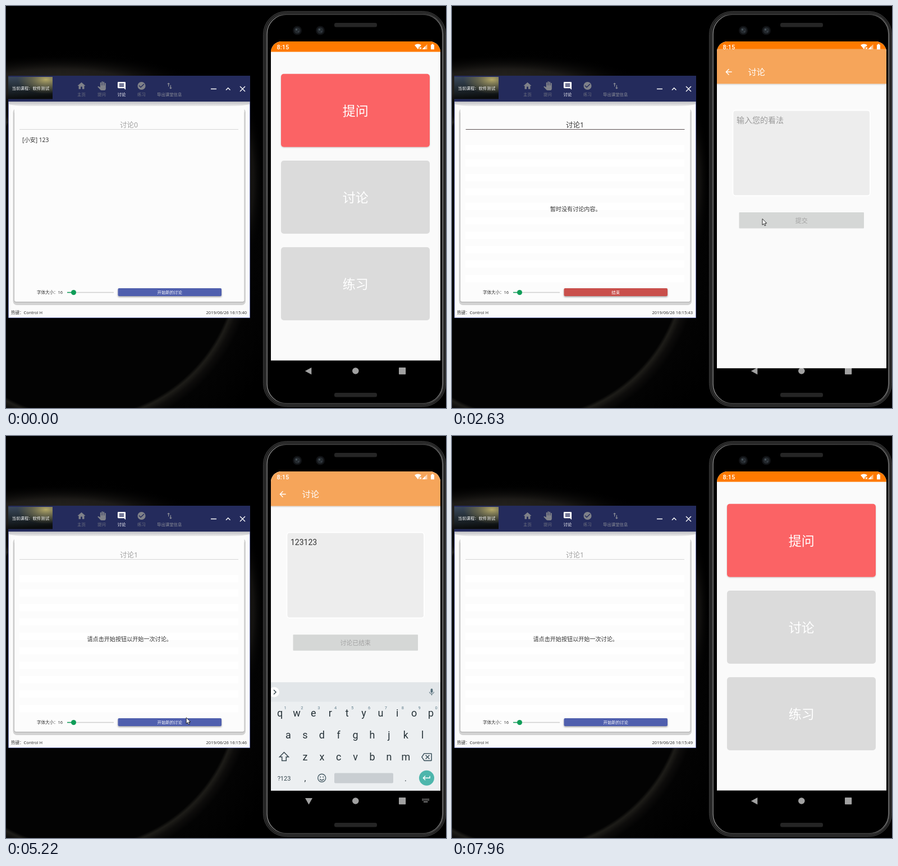
Animation, 784 px wide and 715 px high, one loop 8010 ms. Source, as an HTML page:

```html
<!DOCTYPE html>
<html lang="zh-CN">
<head>
<meta charset="utf-8">
<title>课堂讨论</title>
<style>
html,body{margin:0;width:100%;height:100%;overflow:hidden;background:#000}
svg{display:block;width:784px;height:715px}
text{font-family:"Noto Sans","Noto Sans CJK SC","Noto Sans CJK",sans-serif;white-space:pre}
.phone text{font-family:Roboto,"Noto Sans CJK SC","Noto Sans CJK",sans-serif}
</style>
</head>
<body>
<svg id="stage" viewBox="0 0 784 715"></svg>
<script>
const LOOP = 8010;
const stage = document.getElementById('stage');

// Drawing helpers; text is placed by its vertical centre, with its baseline on a whole pixel.
const text = (x, cy, size, str, fill = '#fff', anchor = 'middle', extra = '') =>
  `<text x="${x}" y="${Math.round(cy + size * .37)}" font-size="${size}" fill="${fill}" text-anchor="${anchor}" ${extra}>${str}</text>`;
const rect = (x, y, w, h, fill, r = 0, extra = '') =>
  `<rect x="${x}" y="${y}" width="${w}" height="${h}" rx="${r}" fill="${fill}" ${extra}/>`;
const circle = (x, y, r, fill, extra = '') => `<circle cx="${x}" cy="${y}" r="${r}" fill="${fill}" ${extra}/>`;
const line = (d, stroke, width, extra = '') =>
  `<path d="${d}" fill="none" stroke="${stroke}" stroke-width="${width}" ${extra}/>`;
const icon = (d, cx, cy, size, fill) =>
  `<path d="${d}" fill="${fill}" transform="translate(${cx - size / 2} ${cy - size / 2}) scale(${size / 24})"/>`;
const range = n => [...Array(n).keys()];

const ICONS = {
  home: 'M10 20v-6h4v6h5v-8h3L12 3 2 12h3v8z',
  hand: 'M23 5.5V20c0 2.2-1.8 4-4 4h-7.3c-1.1 0-2.1-.4-2.9-1.2L1 14.8l1.3-1.2c.4-.4 1-.4 1.4-.1L8 15.9V4c0-.8.7-1.5 1.5-1.5S11 3.2 11 4v7h1V1.5a1.5 1.5 0 0 1 3 0V11h1V2.5a1.5 1.5 0 0 1 3 0V11h1V5.5a1.5 1.5 0 0 1 3 0z',
  comment: 'M22 4a2 2 0 0 0-2-2H4a2 2 0 0 0-2 2v12a2 2 0 0 0 2 2h14l4 4zM18 14H6v-2h12zm0-3H6V9h12zm0-3H6V6h12z',
  check: 'M12 2a10 10 0 1 0 0 20 10 10 0 0 0 0-20zm-2 15l-5-5 1.4-1.4 3.6 3.6 7.6-7.6L19 8z',
  swap: 'M9 3L5 7h3v7h2V7h3zm7 14v-7h-2v7h-3l4 4 4-4z',
  back: 'M20 11H7.8l5.6-5.6L12 4l-8 8 8 8 1.4-1.4L7.8 13H20z',
  mic: 'M12 14a3 3 0 0 0 3-3V5a3 3 0 0 0-6 0v6a3 3 0 0 0 3 3zm5.3-3a5.3 5.1 0 0 1-10.6 0H5c0 3.4 2.7 6.2 6 6.7V21h2v-3.3c3.3-.5 6-3.3 6-6.7z',
  enter: 'M19 7v4H5.8l3.6-3.6L8 6l-6 6 6 6 1.4-1.4L5.8 13H21V7z',
  erase: 'M22 3H7c-.7 0-1.2.4-1.6.9L0 12l5.4 8.1c.4.5.9.9 1.6.9h15a2 2 0 0 0 2-2V5a2 2 0 0 0-2-2zm0 16H7.1L2.4 12l4.7-7H22zm-11.6-2L14 13.4l3.6 3.6 1.4-1.4-3.6-3.6L19 8.4 17.6 7 14 10.6 10.4 7 9 8.4l3.6 3.6L9 15.6z'
};

const defs = `<defs>
  <radialGradient id="corona" gradientUnits="userSpaceOnUse" cx="135" cy="455" r="380">
    <stop offset=".725" stop-color="#030303"/><stop offset=".74" stop-color="#1d1c18"/>
    <stop offset=".765" stop-color="#0d0c0b"/><stop offset=".8" stop-color="#030303"/><stop offset="1" stop-color="#000"/>
  </radialGradient>
  <radialGradient id="glow"><stop offset="0" stop-color="#2b2823"/><stop offset=".5" stop-color="#1d1b18"/><stop offset="1" stop-color="#000" stop-opacity="0"/></radialGradient>
  <linearGradient id="photo" x1="0" y1="0" x2=".15" y2="1">
    <stop offset="0" stop-color="#3b495c"/><stop offset=".5" stop-color="#222c34"/><stop offset="1" stop-color="#0b0d0d"/>
  </linearGradient>
  <radialGradient id="sun" cx=".85" cy=".12" r=".65"><stop offset="0" stop-color="#b5a968"/><stop offset=".5" stop-color="#77724f" stop-opacity=".7"/><stop offset="1" stop-color="#716b45" stop-opacity="0"/></radialGradient>
  <linearGradient id="strip" x1="0" y1="0" x2="0" y2="1"><stop offset="0" stop-color="#bdbdc2"/><stop offset="1" stop-color="#ececec"/></linearGradient>
  <linearGradient id="rim"><stop offset="0" stop-color="#858585"/><stop offset=".1" stop-color="#4a4a4a"/><stop offset=".9" stop-color="#484848"/><stop offset="1" stop-color="#777"/></linearGradient>
  <clipPath id="screen">${rect(472, 63, 302, 605, '#000', 19)}</clipPath>
  <clipPath id="content">${rect(472, 63, 302, 567.5, '#000')}</clipPath>
  <filter id="soft" x="-10%" y="-40%" width="120%" height="200%"><feDropShadow dx="0" dy="1.5" stdDeviation="1.5" flood-opacity=".38"/></filter>
  <filter id="faint" x="-5%" y="-10%" width="110%" height="125%"><feDropShadow dx="0" dy="1" stdDeviation="1" flood-opacity=".22"/></filter>
</defs>`;

const backdrop = rect(0, 0, 784, 715, '#000') + circle(135, 455, 380, 'url(#corona)') +
  '<ellipse cx="95" cy="138" rx="250" ry="52" fill="url(#glow)"/>' +
  '<ellipse cx="425" cy="310" rx="34" ry="150" fill="url(#glow)" opacity=".6"/>';

const tab = (name, x, label, active) =>
  icon(ICONS[name], x, 142, name === 'hand' ? 16 : 17, active ? '#fff' : '#7f8189') +
  text(x, 157, 7.4, label, active ? '#fff' : '#707380');

const desktop = rect(4, 124, 431, 431, '#3d4a9e') + rect(4.7, 125, 429.6, 429.3, '#fbfbfb') +
  '<path d="M5 170H434V175Q420 178 400 178H38Q18 178 5 175Z" fill="url(#strip)"/>' +
  rect(12.5, 182, 414.5, 350, '#d2d2d2', 7) + rect(14.5, 188, 410.5, 339, '#ababab', 3) +
  rect(15, 178, 409.5, 348, '#fcfcfc', 3) +
  rect(4, 124, 431, 46, '#242b5c') +
  rect(4, 126, 79, 39.5, 'url(#photo)') + rect(4, 126, 79, 39.5, 'url(#sun)') +
  text(10.5, 146, 7.4, '当前课程：软件测试', '#fff', 'start') +
  tab('home', 134.5, '主页') + tab('hand', 170.5, '提问') + tab('comment', 206, '讨论', true) +
  tab('check', 241.5, '练习') + icon(ICONS.swap, 291.5, 142, 15, '#8b8d96') + text(291.2, 157, 7.4, '导出课堂信息', '#8a8c96') +
  line('M365 147.5H375M392 149.5L395.7 145.7 399.5 149.5M417 143L426 152M426 143L417 152', '#fff', 1.4) +
  `<g id="stripes">${range(10).map(i => rect(24, 247 + i * 25.7, 390, 13, '#fff')).join('')}</g>` +
  text(219, 211, 12.5, '', '#999', 'middle', 'id="topic"') +
  '<path id="rule" d="M24.500 219.500H414.500" stroke-width="1"/>' +
  text(29, 238, 10.2, '[小安] 123', '#333', 'start', 'id="first"') +
  text(220.2, 361, 10.1, '', '#333', 'middle', 'id="notice"') +
  text(55, 509, 7.5, '字体大小：16', '#333', 'start') +
  line('M109 509.500H192', '#cfcfcf', 1.5) + line('M109 509.500H120', '#0f9d58', 1.5) + circle(120.5, 509.5, 4.5, '#0f9d58') +
  rect(199.5, 502, 184.5, 14, '#4f5fae', 2, 'id="action" filter="url(#soft)"') +
  text(291.7, 509, 7.4, '', '#fff', 'middle', 'id="actionText"') +
  text(9, 545, 7.5, '热键：Control H', '#333', 'start') +
  text(429, 545, 7.6, '', '#333', 'end', 'id="clock"');

const lens = x => circle(x, 43.5, 8, '#111316') + circle(x, 43.5, 5.5, '#24292e') +
  circle(x - 1.5, 42, 1.7, '#49525a') + circle(x + 2, 45.5, 1.2, '#3b434a');

const body = rect(458.5, 9.5, 325, 703, '#1d1d1d', 41, 'stroke="#3f3f3f"') +
  rect(462, 12.5, 318, 697, '#090909', 38, 'stroke="#333" stroke-width="2"') +
  rect(465, 15, 313, 692, '#000', 35, 'stroke="url(#rim)" stroke-width="1.6"') +
  rect(585, 30, 76, 7.5, '#252525', 3) + rect(585, 688, 76, 7.5, '#252525', 3) + lens(519) + lens(560);

const card = (y, fill, label, id = '') =>
  rect(490, y, 265, 130, fill, 5, id && `id="${id}"`) + text(622.7, y + 65.5, 23, label, '#fff', 'middle', id && `id="${id}Text"`);

const home = rect(472, 63, 302, 567.5, '#fafafa') + rect(472, 63, 302, 18.5, '#ff7a00') +
  `<g filter="url(#faint)">${card(120.7, '#fb6465', '提问')}</g>` +
  card(275, '#dbdbdb', '讨论', 'talk') + card(429, '#dbdbdb', '练习');

const sheet = rect(472, 63, 302, 567.5, '#fafafa') +
  rect(472, 63, 302, 61.5, '#f6a55a', 0, 'filter="url(#faint)"') +
  circle(492, 103, 14, '#fff', 'id="ripple" opacity="0"') +
  icon(ICONS.back, 493, 103.5, 17, '#fff') + text(527.5, 103.5, 15.2, '讨论', '#fff', 'start') +
  rect(500.5, 171.7, 244.5, 152, '#ededed', 5, 'stroke="#fff" stroke-width="1.8"') +
  text(507, 188.6, 14, '', '#333', 'start', 'id="entry"') +
  rect(554, 178.5, 1.6, 19.5, '#d81b60', 0, 'id="caret"') +
  rect(511.5, 353.3, 222.5, 28.4, '#d5d7d6', 1, 'id="submit"') +
  text(622.7, 367.5, 10.9, '提交', '#a3a3a3', 'middle', 'id="submitText"');

const KEY = '#263238';
const keyRow = (keys, x, y) => [...keys].map((k, i) => text(x + i * 29.9, y, 18, k, KEY)).join('');
const keyboard = rect(472, 438, 302, 193, '#eceff1') + rect(472, 438, 302, 34.5, '#e2e6e9') +
  circle(478, 455.5, 9, '#fff') + line('M477 451.500L481 455.500 477 459.500', '#37474f', 1.5) +
  icon(ICONS.mic, 758.5, 455.5, 15, '#546e7a') +
  keyRow('qwertyuiop', 488, 492) + keyRow('asdfghjkl', 503, 531) + keyRow('zxcvbnm', 533, 570) +
  range(10).map(i => text(497.5 + i * 29.9, 483, 7.5, (i + 1) % 10, '#607d8b')).join('') +
  line('M495.500 562.500L487.500 570.700H491.700V577.500H499.300V570.700H503.500Z', '#37474f', 1.5) +
  icon(ICONS.erase, 749.5, 571, 19, '#455a64') +
  text(495.5, 608.5, 11, '?123', '#37474f') + text(533, 608, 15, ',', KEY) + text(712, 608, 15, '.', KEY) +
  circle(562.7, 608.3, 7, 'none', 'stroke="#455a64" stroke-width="1.4"') +
  circle(560.2, 606.5, 1.1, '#455a64') + circle(565.2, 606.5, 1.1, '#455a64') +
  line('M559 610Q562.700 614.500 566.400 610', '#455a64', 1.4) +
  rect(585, 599.5, 105, 18, '#c9ced2', 2) +
  circle(749.5, 608.3, 13.5, '#4db6ac') + icon(ICONS.enter, 749.5, 608.3, 17, '#fff');

const system = `<g fill="#fff" opacity=".63">
    <path id="navBack"/>${circle(622.8, 649, 5.8, '#fff')}${rect(700, 643, 12.2, 12.2, '#fff', .8)}
    <g id="navKeys">${range(12).map(i => rect(741.5 + i % 6 * 2.2, 645 + (i / 6 | 0) * 2.2, 1.4, 1.4, '#fff')).join('')}${rect(744, 650, 7.5, 1.4, '#fff')}</g>
  </g>` + text(482.5, 72.6, 11, '8:15', '#fff', 'start', 'font-weight="500"') +
  '<path d="M728 69.500Q734 65.500 740 69.500L737.500 72.500H735.500V75L734 77Z" fill="#fff"/>' +
  line('M736.800 73.500L740 76.700M740 73.500L736.800 76.700', '#fff', 1.1) +
  '<path d="M741.500 77L750.500 68V77Z" fill="#fff" opacity=".55"/><path d="M741.500 77L747 71.500V77Z" fill="#fff"/>' +
  '<path d="M757 69H758.500V67.500H761.500V69H763V77.200H757Z" fill="#fff"/>';

stage.innerHTML = defs + backdrop + desktop +
  `<g class="phone">${body}<g clip-path="url(#screen)">${home}<g id="sheet">${sheet}</g>
   <g clip-path="url(#content)"><g id="keyboard">${keyboard}</g></g>${system}</g></g>
   <path id="cursor" d="M0 0V10.800L2.500 8.500 4.200 12.300 6 11.500 4.400 7.700H7.800Z" fill="#fff" stroke="#111" stroke-width=".9"/>`;

const el = {};
stage.querySelectorAll('[id]').forEach(n => el[n.id] = n);
const set = (name, attrs) => { for (const k in attrs) el[name].setAttribute(k, attrs[k]); };
const show = (name, on) => set(name, { visibility: on ? 'visible' : 'hidden' });
const write = (name, str) => { if (el[name].textContent !== str) el[name].textContent = str; };
const progress = (t, from, length) => Math.min(1, Math.max(0, (t - from) / length));
const easeOut = p => 1 - (1 - p) ** 3;

// Pointer stops: time, x, y
const PATH = [
  [40, 706, 710], [220, 600, 652], [480, 360, 540], [700, 235, 508], [820, 218, 505], [1080, 218, 505],
  [1200, 330, 450], [1380, 560, 360], [1500, 614, 344], [2300, 614, 344], [2530, 565, 372], [2630, 553, 379],
  [2720, 556, 340], [2900, 572, 232], [3600, 572, 232], [3780, 510, 340], [3980, 392, 474], [4070, 373, 489],
  [4200, 368, 492], [4450, 316, 507], [5200, 316, 507], [5500, 390, 420], [5830, 462, 240], [6150, 490, 110],
  [6250, 492, 101], [6650, 492, 101], [6760, 562, 198], [6950, 668, 400], [7150, 730, 560], [7450, 753, 652],
  [7600, 757, 688], [7730, 760, 715]
];
function pointer(t) {
  const i = Math.max(1, PATH.findIndex(p => p[0] >= t));
  const [a, b] = [PATH[i - 1], PATH[i]];
  const p = progress(t, a[0], b[0] - a[0]);
  return [a[1] + (b[1] - a[1]) * p, a[2] + (b[2] - a[2]) * p];
}

function draw(t) {
  // Teacher's window
  const fresh = t < 930, live = !fresh && t < 5090;
  write('topic', fresh ? '讨论0' : '讨论1');
  set('topic', { fill: live ? '#333' : '#a0a0a0' });
  set('rule', { stroke: live ? '#5a5052' : '#b0b0b0', 'stroke-dasharray': live ? 'none' : '1 1' });
  show('first', fresh);
  show('stripes', !fresh);
  write('notice', fresh ? '' : live ? '暂时没有讨论内容。' : '请点击开始按钮以开始一次讨论。');
  set('action', { fill: live ? '#c94f4c' : '#4f5fae' });
  write('actionText', live ? '结束' : '开始新的讨论');
  write('clock', '2019/06/26 16:15:' + (t < 40 ? 40 : 40 + Math.floor((t + 1040) / 1000)));

  // Student's phone
  const joined = t >= 1000 && t < 5140, ended = t >= 5140;
  set('talk', { fill: joined ? '#f6a55a' : '#dbdbdb', filter: joined ? 'url(#faint)' : 'none' });
  write('talkText', joined ? '参与讨论' : '讨论');

  const opening = easeOut(progress(t, 2376, 356)), closing = easeOut(progress(t, 6607, 500));
  const shift = 605 * (1 - opening + closing);
  show('sheet', shift < 605);
  set('sheet', { transform: `translate(0 ${shift.toFixed(2)})` });
  set('ripple', { opacity: t < 6590 ? 0 : .2 * (1 - progress(t, 6780, 220)) });

  const typed = Math.floor(7 * progress(t, 3370, 420));
  const entry = '123123'.slice(0, typed);
  write('entry', entry || '输入您的看法');
  set('entry', { fill: typed ? '#333' : '#9a9a9a' });
  const focused = t >= 2950 && !ended;
  const blink = t < 3800 || (t - 3800) % 1000 < 500;
  set('caret', { x: 507 + Math.min(6, typed) * 7.86, visibility: focused && blink ? 'inherit' : 'hidden' });
  const ready = typed > 0 && !ended;
  set('submitText', { fill: ready ? '#222' : '#a3a3a3' });
  set('submit', { filter: ready ? 'url(#faint)' : 'none' });
  write('submitText', ended ? '讨论已结束' : '提交');

  const raised = easeOut(progress(t, 2960, 240)) - progress(t, 6600, 100);
  show('keyboard', raised > 0);
  set('keyboard', { transform: `translate(0 ${(193 * (1 - raised)).toFixed(2)})` });
  show('navKeys', raised > 0);
  set('navBack', { d: raised > 0 ? 'M533 644H546L539.500 655.500Z' : 'M532.800 649.300L544.300 643V655.600Z' });

  const moving = t >= 40 && t < 7730;
  show('cursor', moving);
  if (moving) set('cursor', { transform: `translate(${pointer(t).map(v => v.toFixed(2)).join(' ')})` });
}

const start = performance.now();
function tick() {
  draw((performance.now() - start) % LOOP);
  requestAnimationFrame(tick);
}
tick();
</script>
</body>
</html>
```
